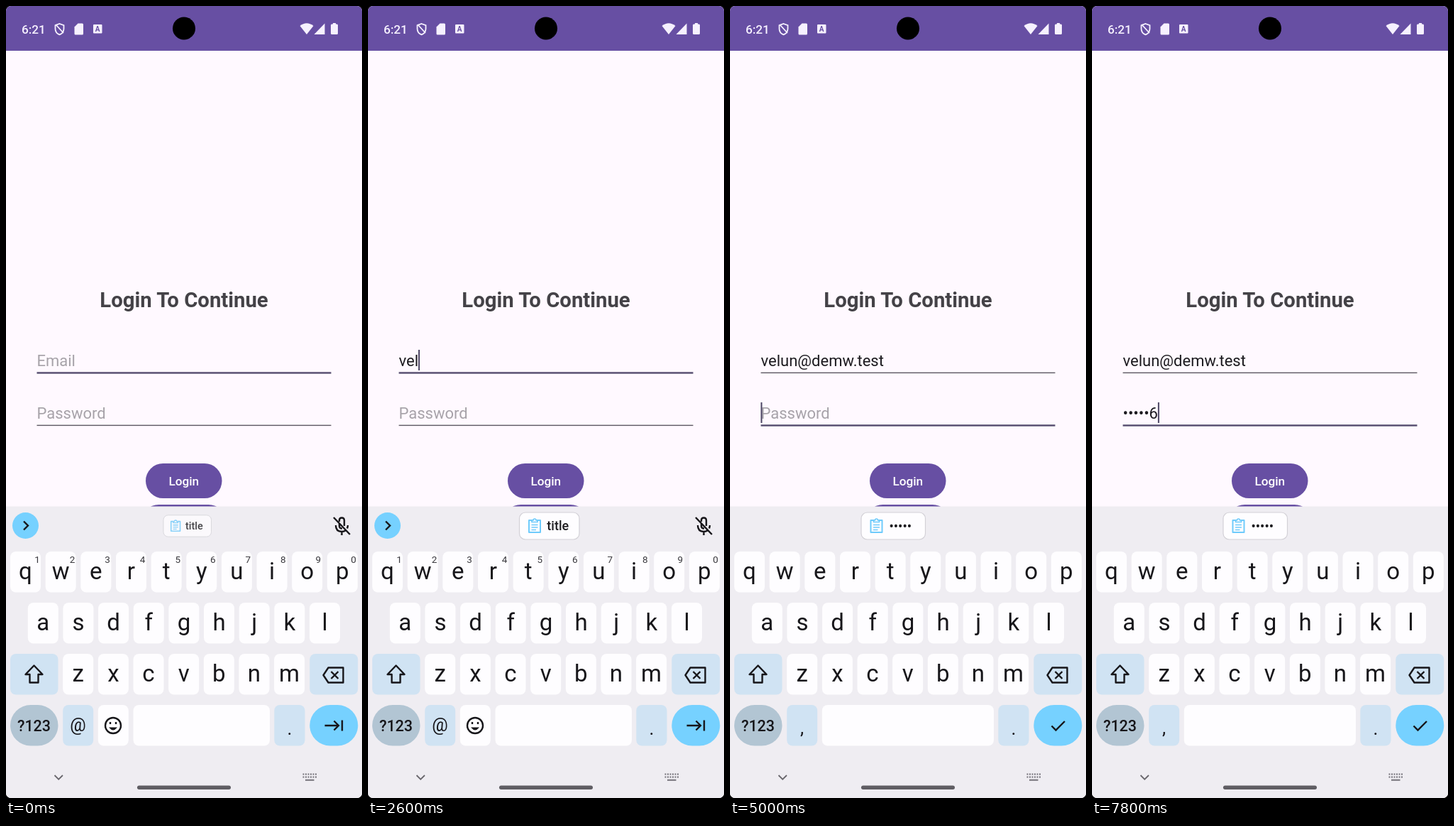
Recreate the animation shown at these times as an HTML page. Size 502 by 1115 pixels, loop 8000 ms.

```html
<!DOCTYPE html>
<html lang="en">
<head>
<meta charset="utf-8">
<title>Login screen</title>
<style>
  html, body { margin: 0; width: 100%; height: 100%; overflow: hidden; background: #000; }
  svg { display: block; width: 100%; height: 100%; }
  text { font-family: Roboto, "Noto Sans", sans-serif; }
  .mid { text-anchor: middle; }
  .field { font-size: 22px; }
  .key { font-size: 33px; fill: #17161a; text-anchor: middle; }
  .digit { font-size: 13.5px; fill: #38373c; text-anchor: middle; }
  .chip { font-size: 18px; font-weight: 500; fill: #1d1c20; }
  .line { fill: none; stroke: #17161a; stroke-width: 2.4; }
  .clip { fill: none; stroke: #6fcbfb; stroke-width: 2; }
</style>
</head>
<body>
<svg viewBox="0 0 502 1115">
  <defs><clipPath id="screen"><rect width="502" height="1115" rx="7"/></clipPath></defs>
  <rect width="502" height="1115" fill="#000"/>
  <g clip-path="url(#screen)">
    <rect width="502" height="1115" fill="#fff9ff"/>

    <!-- status bar -->
    <rect width="502" height="63" fill="#674fa3"/>
    <g fill="#f6f1ff">
      <text x="22" y="38.5" font-size="17.2" font-weight="500">6:21</text>
      <path d="M75.5 25 L81.5 27.2 V32 Q81.5 38 75.5 40.3 Q69.5 38 69.5 32 V27.2 Z M70 26 L81 38" fill="none" stroke="#f6f1ff" stroke-width="1.8"/>
      <path d="M101.5 24.5 H107.5 Q109 24.5 109 26 V39 Q109 40.5 107.5 40.5 H98 Q96.5 40.5 96.5 39 V29.5 Z"/>
      <rect x="123" y="26" width="12.5" height="12.5" rx="1"/>
      <text class="mid" x="129.2" y="36" font-size="10" font-weight="700" fill="#674fa3">A</text>
      <path d="M414.5 28 Q424 20.5 433.5 28 L424 40 Z"/>
      <path d="M449.5 24.5 V40 H434.5 Z"/>
      <path d="M461 25.5 V24 H465 V25.5 H466.5 Q468 25.5 468 27 V38.5 Q468 40 466.5 40 H459.5 Q458 40 458 38.5 V27 Q458 25.5 459.5 25.5 Z"/>
    </g>
    <circle cx="251" cy="31.5" r="16" fill="#000"/>

    <!-- form -->
    <text class="mid" x="251" y="424" font-size="29.3" font-weight="700" fill="#444247">Login To Continue</text>
    <text id="email" class="field" x="43.5" y="507"></text>
    <text id="pass" class="field" x="43.5" y="581"></text>
    <rect id="emailLine" x="43.5" width="415"/>
    <rect id="passLine" x="43.5" width="415"/>
    <rect id="caret" width="2" height="29" fill="#4d4665"/>
    <rect x="197" y="644" width="107.5" height="49" rx="24.5" fill="#674fa3"/>
    <text class="mid" x="250.8" y="675" font-size="17.2" font-weight="500" fill="#fff">Login</text>
    <rect x="191" y="702" width="119" height="49" rx="24.5" fill="#674fa3"/>

    <!-- keyboard -->
    <rect y="704.5" width="502" height="410.5" fill="#efedf2"/>
    <g id="keys"></g>
    <g class="line">
      <path d="M39.5 928.5 L51.5 941 H45.5 V952.5 H33.5 V941 H27.5 Z" stroke-linejoin="round"/>
      <path d="M454.5 931.5 H475.5 V952.5 H454.5 L447.5 942 Z M458.5 937 L468.5 947 M468.5 937 L458.5 947" stroke-linejoin="round"/>
    </g>
    <text class="mid" x="39.5" y="1020.5" font-size="21.5" font-weight="500" fill="#17161a">?123</text>

    <g id="emailKeys">
      <g id="digits"></g>
      <circle cx="27.5" cy="731.5" r="18.5" fill="#76d1ff"/>
      <path class="line" d="M25 725.5 L31 731.5 L25 737.5"/>
      <g class="line" stroke-width="2">
        <path d="M470 726 V724 Q470 720.5 473.5 720.5 Q477 720.5 477 724 V732 M470 729 V732 Q470 735.5 474 735.5 M465 731 Q465 740 473.5 740 Q476.5 740 478.5 738.5 M482 731 Q482 733.5 481 735.5 M473.5 740 V745 M462 720 L485 744"/>
      </g>
      <g id="titleChip">
        <rect x="213.5" y="713" width="84.5" height="38" rx="8.5" fill="#fefdff" stroke="#d3d1d7" stroke-width="1.2"/>
        <g class="clip" transform="translate(235 732)"><use href="#board"/></g>
        <text class="chip" x="252.3" y="738">title</text>
      </g>
      <text class="mid" x="101.5" y="1021" font-size="25" fill="#17161a">@</text>
      <g class="line">
        <circle cx="151" cy="1013" r="11"/>
        <path d="M145.2 1015.5 Q151 1023.5 156.8 1015.5 Z" fill="#17161a" stroke="none"/>
        <path d="M147 1008 V1011 M155 1008 V1011"/>
        <path d="M449.5 1013 H469 M462.5 1006.5 L469 1013 L462.5 1019.5 M474 1005.5 V1020.5"/>
      </g>
    </g>

    <g id="passKeys">
      <rect x="185" y="713" width="90.5" height="38" rx="8.5" fill="#fefdff" stroke="#d3d1d7" stroke-width="1.2"/>
      <g class="clip" transform="translate(206.5 732)">
        <g id="board">
          <path d="M-3 -8 H-8 V9 H8 V-8 H3" stroke-linejoin="round"/>
          <path d="M-4 -5.5 V-8 H-2 Q-2 -10 0 -10 Q2 -10 2 -8 H4 V-5.5 Z M-4.5 -1.5 H4.5 M-4.5 2 H4.5 M-4.5 5.5 H2" stroke-width="1.7"/>
        </g>
      </g>
      <text class="chip" x="224.5" y="738.5">•••••</text>
      <text class="mid" x="101.5" y="1025" font-size="26" fill="#17161a">,</text>
      <path class="line" d="M453.5 1013.5 L459.5 1019.5 L472 1007"/>
    </g>

    <!-- navigation -->
    <path d="M68.5 1083 L74.2 1088.7 L80 1083" fill="none" stroke="#69676d" stroke-width="1.8"/>
    <path d="M418.5 1081.5 H438 M418.5 1085.5 H438" stroke="#737178" stroke-width="2" stroke-dasharray="2 1.5"/>
    <path d="M422 1089.7 H434.5" stroke="#737178" stroke-width="2"/>
    <rect x="185" y="1097.5" width="132" height="5.5" rx="2.7" fill="#5f5d63"/>
  </g>
</svg>
<script>
const LOOP = 8000, STEP = 200, PITCH = 49.65, BLINK = 500;
const EMAIL = 'velun@demw.test', PASSWORD = '123456';
const EMAIL_START = 2100, EMAIL_GAP = 180;
const PASS_START = 5600, PASS_GAP = 220;
const FOCUS_PASS = 4800;
const WHITE = '#fefdff', BLUE = '#d0e3f3', GREY = '#b2c5d3', SKY = '#76d1ff';

const $ = id => document.getElementById(id);

function add(parent, tag, attrs, text = '') {
  const el = document.createElementNS('http://www.w3.org/2000/svg', tag);
  for (const name in attrs) el.setAttribute(name, attrs[name]);
  el.textContent = text;
  parent.appendChild(el);
  return el;
}

function set(el, attrs) {
  for (const name in attrs) el.setAttribute(name, attrs[name]);
}

function addKey(x, y, width, fill, rx = 8) {
  return add($('keys'), 'rect', { x, y, width, height: 57.5, rx, fill });
}

function addRow(letters, x0, y) {
  [...letters].forEach((ch, i) => {
    const x = x0 + i * PITCH;
    addKey(x, y, 43, WHITE);
    add($('keys'), 'text', { class: 'key', x: x + 21.5, y: y + 38.5 }, ch);
  });
}

addRow('qwertyuiop', 6, 768);
addRow('asdfghjkl', 30.8, 840);
addRow('zxcvbnm', 80.2, 912);
addKey(6, 912, 67.5, BLUE);
addKey(428.3, 912, 68, BLUE);
addKey(6, 984, 67.5, GREY, 28.75);
addKey(80.2, 984, 43, BLUE);
const emojiKey = addKey(129.8, 984, 43, WHITE);
const spaceKey = addKey(179.5, 984, 192.5, WHITE);
addKey(378.3, 984, 43.2, BLUE);
addKey(428.3, 984, 68, SKY, 28.75);
add($('keys'), 'text', { class: 'mid', x: 400, y: 1026, 'font-size': 26, fill: '#17161a' }, '.');
[...'1234567890'].forEach((d, i) =>
  add($('digits'), 'text', { class: 'digit', x: 44 + i * 49.55, y: 784 }, d));

const typed = (t, start, gap, max) =>
  Math.max(0, Math.min(max, Math.floor((t - start) / gap) + 1));

// Blinking restarts at each key press or focus change.
function caretOn(t) {
  let last = -800;
  if (t >= EMAIL_START) last = EMAIL_START + (typed(t, EMAIL_START, EMAIL_GAP, EMAIL.length) - 1) * EMAIL_GAP;
  if (t >= FOCUS_PASS) last = FOCUS_PASS;
  if (t >= PASS_START) last = PASS_START + (typed(t, PASS_START, PASS_GAP, PASSWORD.length) - 1) * PASS_GAP;
  return (t - last) % (2 * BLINK) < BLINK;
}

function setField(el, value, hint) {
  el.textContent = value || hint;
  el.setAttribute('fill', value ? '#1d1b20' : '#a7a3a9');
}

function setLine(el, y, focused) {
  set(el, focused
    ? { y: y - 1.2, height: 2.4, fill: '#544c6e' }
    : { y: y - 0.8, height: 1.4, fill: '#5c5862' });
}

function draw(time) {
  const t = Math.floor(time / STEP) * STEP;
  const inPass = t >= FOCUS_PASS;
  const email = EMAIL.slice(0, typed(t, EMAIL_START, EMAIL_GAP, EMAIL.length));
  const count = typed(t, PASS_START, PASS_GAP, PASSWORD.length);
  const pass = count ? '•'.repeat(count - 1) + PASSWORD[count - 1] : '';

  setField($('email'), email, 'Email');
  setField($('pass'), pass, 'Password');
  setLine($('emailLine'), 516.5, !inPass);
  setLine($('passLine'), 590.5, inPass);

  const active = inPass ? $('pass') : $('email');
  const width = (inPass ? pass : email) ? active.getComputedTextLength() : 0;
  set($('caret'), {
    x: 43.4 + width,
    y: inPass ? 558 : 484,
    visibility: caretOn(t) ? 'visible' : 'hidden'
  });

  $('emailKeys').style.display = inPass ? 'none' : '';
  $('passKeys').style.visibility = inPass ? 'visible' : 'hidden';
  $('board').style.visibility = 'visible';
  $('passKeys').style.opacity = inPass ? 1 : 0;
  emojiKey.style.display = inPass ? 'none' : '';
  set(spaceKey, inPass ? { x: 129.8, width: 242.2 } : { x: 179.5, width: 192.5 });

  const scale = t < STEP ? 0.8 : 1;
  set($('titleChip'), {
    transform: `translate(255.7 732) scale(${scale}) translate(-255.7 -732)`,
    opacity: t < STEP ? 0.8 : 1
  });
}

const begin = performance.now();
function tick() {
  draw((performance.now() - begin) % LOOP);
  requestAnimationFrame(tick);
}
draw(0);
requestAnimationFrame(tick);
</script>
</body>
</html>
```
